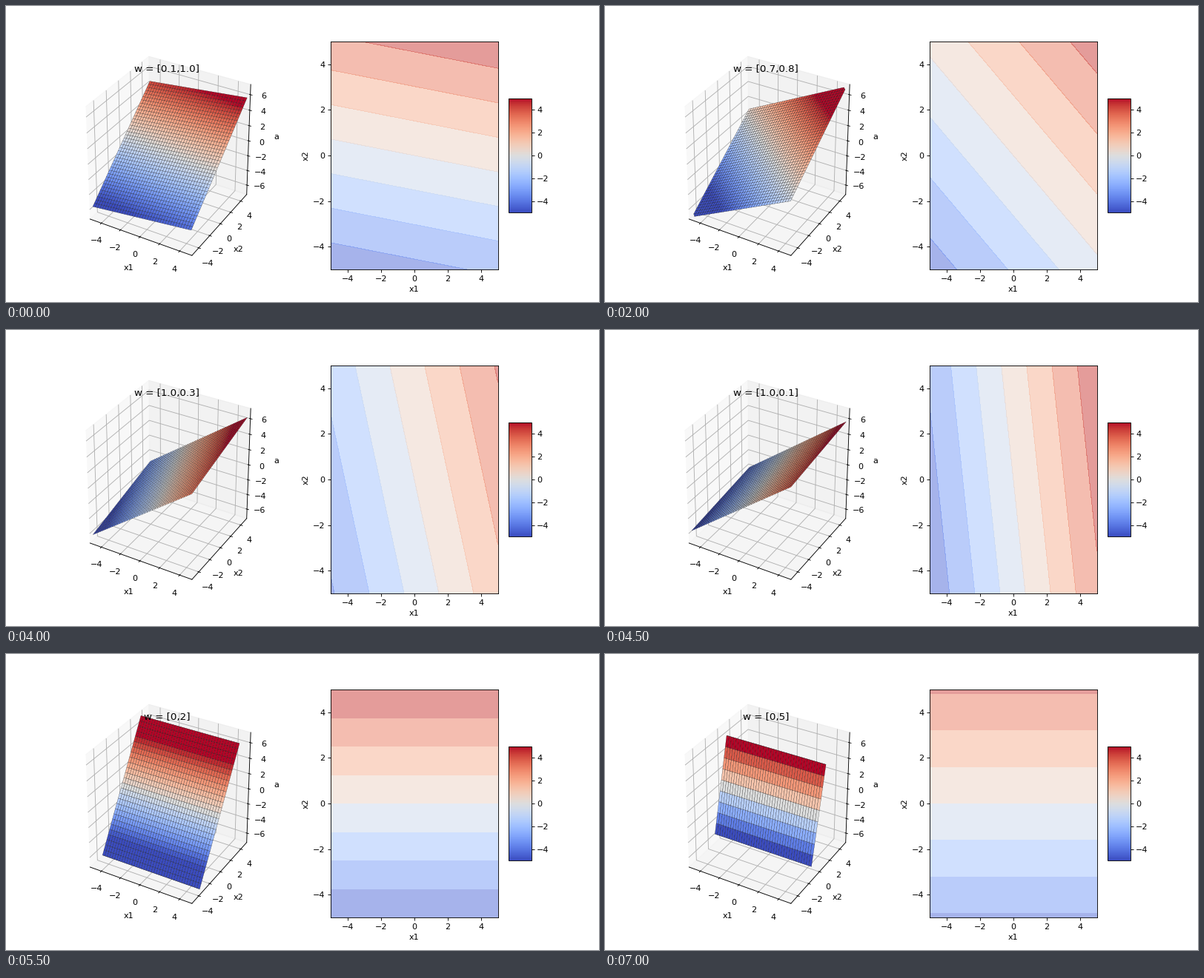
Animation of 800x400 px, one loop 7500 ms. Source, as a matplotlib script:

```python
import numpy as np
import matplotlib.pyplot as plt
from matplotlib.animation import FuncAnimation
from matplotlib.cm import ScalarMappable
from matplotlib.colors import Normalize

LIM, ZLIM, CLIM = 5, 7, 5
PAD = 25 / 24  # panes sit slightly outside the data range
TICKS = range(-4, 5, 2)

# A unit vector turning from x2 to x1, then a growing one along x2.
angles = np.linspace(0, np.pi / 2, 12)[1:-1]
weights = [(np.sin(t), np.cos(t), "w = [{:.1f},{:.1f}]") for t in angles]
weights += [(0, k, "w = [{},{}]") for k in range(1, 6)]

grid = np.linspace(-LIM, LIM, 40)
X1, X2 = np.meshgrid(grid, grid)

fig = plt.figure(figsize=(10, 5), dpi=80)

space = fig.add_axes([0.095, 0.11, 0.3523, 0.77], projection="3d")
space.apply_aspect = lambda position=None: None  # fill the whole box
space.set_box_aspect((1, 1, 1), zoom=np.sqrt(3) / 1.8294640721620434)
space.set(xlim=(-LIM * PAD, LIM * PAD), ylim=(-LIM * PAD, LIM * PAD),
          zlim=(-ZLIM * PAD, ZLIM * PAD), xticks=TICKS, yticks=TICKS,
          zticks=range(-6, 7, 2), xlabel="x1", ylabel="x2", zlabel="a")
space.view_init(elev=30, azim=-60)

plane = fig.add_subplot(122)
plane.set(xlim=(-LIM, LIM), ylim=(-LIM, LIM), xticks=TICKS, yticks=TICKS,
          xlabel="x1", ylabel="x2")
scale = ScalarMappable(Normalize(-CLIM, CLIM), "coolwarm")
fig.colorbar(scale, ax=plane, shrink=0.5, aspect=5, ticks=TICKS)

drawn = []


def update(i):
    while drawn:
        drawn.pop().remove()
    w1, w2, label = weights[i]
    a = w1 * X1 + w2 * X2
    visible = np.where(np.abs(a) <= ZLIM, a, np.nan)
    drawn.append(space.plot_surface(
        X1, X2, visible, cmap="coolwarm", vmin=-CLIM, vmax=CLIM,
        edgecolor="black", linewidth=0.2))
    drawn.append(plane.contourf(X1, X2, a, cmap="coolwarm", alpha=0.5))
    space.set_title(label.format(w1, w2), y=0.92)
    return drawn


anim = FuncAnimation(fig, update, frames=len(weights), interval=500,
                     repeat=True, repeat_delay=0, blit=False)
plt.show()
```
